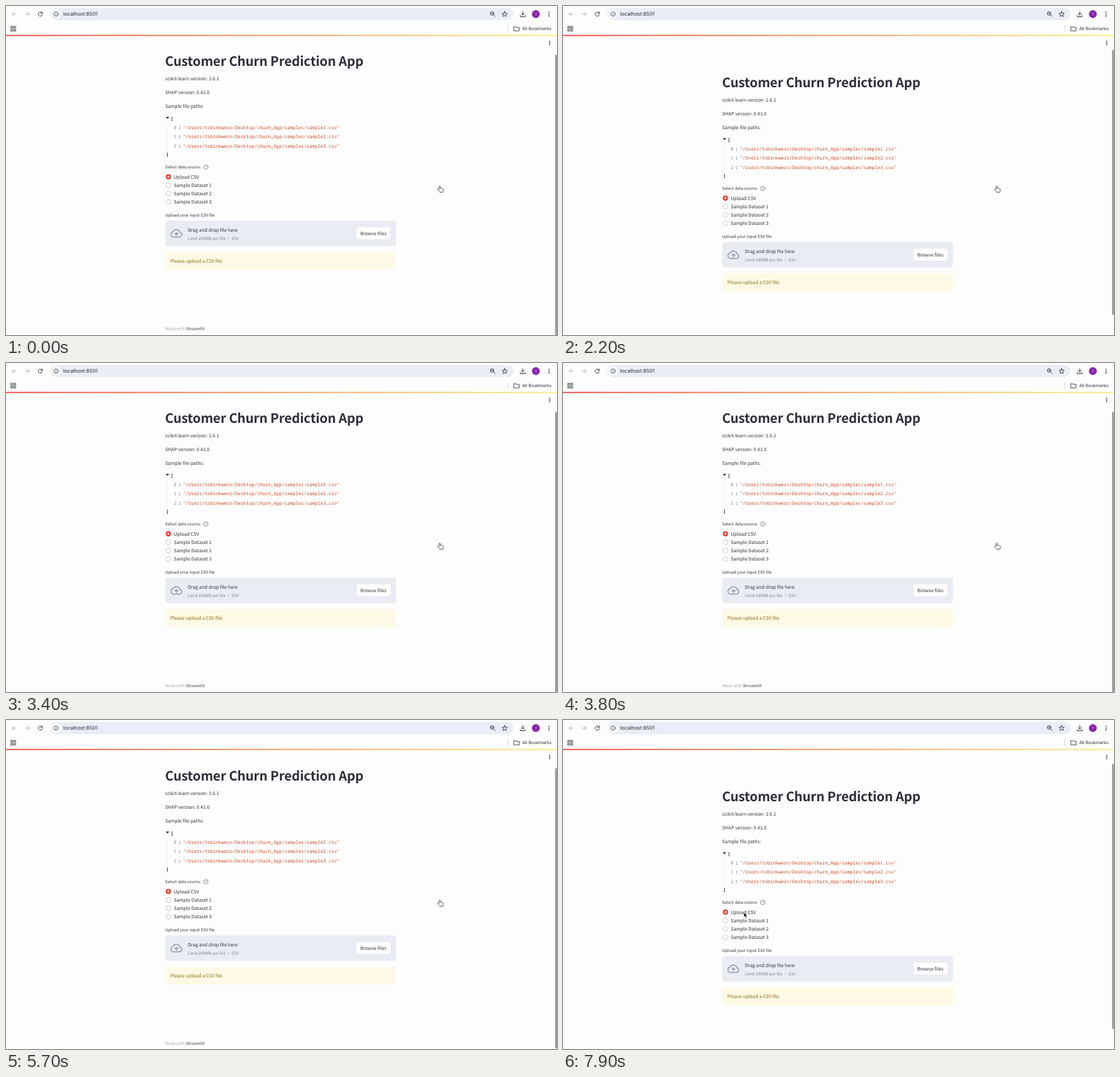
An HTML page that plays this animation: 800x478 px, repeating every 8000 ms.

```html
<!DOCTYPE html>
<html lang="en">
<head>
<meta charset="utf-8">
<title>Customer Churn Prediction App</title>
<style>
  html, body { margin: 0; width: 100%; height: 100%; overflow: hidden; background: #fdfdfd; }
  svg { display: block; width: 100%; height: 100%; }
  text { font: 6.82px "Noto Sans CJK SC", "Noto Sans CJK JP", "Noto Sans CJK KR", sans-serif;
         fill: #31333f; text-rendering: geometricPrecision; white-space: pre; }
  .title { font-size: 18.75px; font-weight: 700; letter-spacing: -.1px; fill: #2b2d39; }
  .small { font-size: 5.96px; }
  .mono { font: 6.66px "Noto Sans Mono", "DejaVu Sans Mono", monospace; }
  .bold { font-weight: 700; }
  .ui { font-family: Inter, Roboto, sans-serif; fill: #2a2c30; }
  .line { fill: none; stroke: #3c4043; stroke-width: 1; stroke-linecap: round; stroke-linejoin: round; }
  .off { stroke: #b4b7ba; }
</style>
</head>
<body>
<svg viewBox="0 0 800 478" preserveAspectRatio="none">
  <defs>
    <linearGradient id="accent">
      <stop offset="0" stop-color="#f5483f"/>
      <stop offset="1" stop-color="#fbf07f"/>
    </linearGradient>
  </defs>
  <rect width="800" height="478" fill="#fdfdfd"/>

  <g id="page">
    <text class="title" x="231" y="86.6">Customer Churn Prediction App</text>
    <text x="231" y="108.2">scikit-learn version: 1.6.1</text>
    <text x="231" y="128">SHAP version: 0.41.0</text>
    <text x="231" y="147.8">Sample file paths:</text>

    <path d="M232 161h5l-2.5 3z" fill="#31333f"/>
    <text class="mono bold" x="239" y="166.4">[</text>
    <path d="M234.5 170v39" stroke="#ebebee" stroke-width=".7"/>
    <g id="paths"></g>
    <text class="mono bold" x="232.4" y="218.2">]</text>

    <text class="small" x="231" y="236.3">Select data source:</text>
    <circle class="line" cx="290" cy="234" r="3.3" style="stroke-width:.7;stroke:#6d6f7a"/>
    <text class="small" x="290" y="236" text-anchor="middle" style="font-size:5px;fill:#5b5d68">?</text>
    <g id="radios"></g>

    <text class="small" x="231" y="306">Upload your input CSV file</text>
    <rect x="231" y="311.8" width="335.3" height="37.2" rx="3.8" fill="#e9edf3"/>
    <path class="line" d="M243 335.7a3.9 3.9 0 0 1-.5-7.7 5.4 5.4 0 0 1 10.1 1 3.4 3.4 0 0 1-.4 6.7zM247.5 333.6v-4.2m-2.2 2l2.2-2.2 2.2 2.2"
          style="stroke:#979bb0;stroke-width:1.4"/>
    <text x="264" y="328">Drag and drop file here</text>
    <text class="small" x="264" y="339.8" style="fill:#7d808b">Limit 200MB per file • CSV</text>
    <rect x="508.4" y="321.1" width="50.4" height="18.2" rx="3.8" fill="#fefefe" stroke="#d9dce2" stroke-width=".5"/>
    <text x="533.5" y="333" text-anchor="middle">Browse files</text>

    <rect x="231" y="357.5" width="335.3" height="26" rx="3.8" fill="#fef9e5"/>
    <text x="238.8" y="372.7" style="fill:#8c6c10">Please upload a CSV file.</text>
    <text class="small" x="231" y="471.2" style="fill:#a6a7ac">Made with <tspan class="bold" style="fill:#777982">Streamlit</tspan></text>
  </g>

  <g id="browser">
    <path class="line off" d="M14.8 11.8h-6m2.8-2.8l-2.8 2.8 2.8 2.8M27.8 11.8h6m-2.8-2.8l2.8 2.8-2.8 2.8"/>
    <path class="line" d="M52.3 10a3 3 0 1 0 .5 2.6M52.8 8.6v2.2h-2.2"/>
    <rect x="64" y="3" width="673" height="17.4" rx="8.7" fill="#e8edf6"/>
    <circle cx="72.8" cy="11.7" r="6.8" fill="#fbfcfd"/>
    <circle class="line" cx="72.6" cy="11.7" r="3.2" style="stroke-width:.8"/>
    <path class="line" d="M72.6 11.6v1.6M72.6 10v.1" style="stroke-width:.8"/>
    <text class="ui" x="83" y="14.3" style="font-size:7.35px">localhost:8501</text>

    <circle class="line" cx="705.8" cy="10.8" r="2.5"/>
    <path class="line" d="M707.8 12.8l2.4 2.4M704.8 10.8h2"/>
    <path id="star" class="line" style="stroke-width:.9"/>
    <path class="line" d="M750.3 8v5m-2.3-2.2l2.3 2.3 2.3-2.3M746.8 13.6v2h7v-2"/>
    <circle cx="769.3" cy="11.8" r="5.7" fill="#8a25ab"/>
    <text class="ui" x="769.3" y="13.6" text-anchor="middle" style="font-size:5px;fill:#e5c9ee">T</text>
    <g id="dots" fill="#3c4043"></g>

    <g class="line" style="stroke-width:.9">
      <rect x="7.3" y="29.6" width="2.5" height="2.5"/>
      <rect x="11.6" y="29.6" width="2.5" height="2.5"/>
      <rect x="7.3" y="33.9" width="2.5" height="2.5"/>
      <rect x="11.6" y="33.9" width="2.5" height="2.5"/>
    </g>
    <path d="M728.4 28v9.5" stroke="#cfd6e2" stroke-width=".9"/>
    <path class="line" d="M737.6 30h2.6l1 1.1h3.9v5h-7.5z" style="stroke-width:.9"/>
    <text class="ui" x="749.5" y="35" style="font-size:6.3px">All Bookmarks</text>
    <rect y="41.9" width="800" height="1.7" fill="url(#accent)"/>
  </g>

  <rect id="thumb" x="797.2" width="2.8" rx="1.2" fill="#9d9da1"/>
  <path id="hand" d="M2.2 5V1.1c0-1.3 1.7-1.3 1.7 0v2.3c.6-.5 1.4-.3 1.6.3.6-.4 1.3-.1 1.5.5.7-.3 1.4.1 1.4.9v1.6c0 1-.7 1.5-.8 2.5H3.3C2.8 7.900 1.300 7 .3 5.700-.2 4.800.7 4.200 1.300 4.700z"
        fill="#fff" stroke="#33353b" stroke-width=".8" stroke-linejoin="round"/>
  <path id="arrow" d="M0 0v7.400l1.700-1.600 1.200 2.800 1.400-.6-1.200-2.700h2.300z"
        fill="#111" stroke="#fff" stroke-width=".6" stroke-linejoin="round"/>
</svg>
<script>
const $ = id => document.getElementById(id);
const LOOP = 8000, STEP = 100, SCROLL_MAX = 31;

$("paths").innerHTML = [0, 1, 2].map(i => {
  const y = 179 + i * 13.4;
  return `<text class="mono" x="243.400" y="${y}" style="fill:#958fa6">${i}</text>
    <text class="mono bold" x="250" y="${y}">:</text>
    <text class="mono" x="256.800" y="${y}" style="fill:#cd4a24">"/Users/tobinkwero/Desktop/churn_App/samples/sample${i + 1}.csv"</text>`;
}).join("");

$("radios").innerHTML = ["Upload CSV", "Sample Dataset 1", "Sample Dataset 2", "Sample Dataset 3"].map((label, i) => {
  const y = 248.1 + i * 12.2;
  const mark = i
    ? `<circle cx="235.800" cy="${y}" r="3.600" fill="#fefefe" stroke="#b4b6be" stroke-width=".7"/>`
    : `<circle cx="235.800" cy="${y}" r="3.900" fill="#f0453c"/><circle cx="235.800" cy="${y}" r="1.400" fill="#fff"/>`;
  return `${mark}<text x="243.400" y="${y + 2.7}">${label}</text>`;
}).join("");

$("dots").innerHTML = [[788.4, 11.8, 2.7], [789.4, 53.8, 2.3]].map(([x, y, gap]) =>
  [-1, 0, 1].map(k => `<circle cx="${x}" cy="${y + k * gap}" r=".9"/>`).join("")).join("");

$("star").setAttribute("d", "M" + Array.from({ length: 10 }, (_, i) => {
  const a = i * Math.PI / 5, r = i % 2 ? 1.8 : 4;
  return `${724 + r * Math.sin(a)} ${12 - r * Math.cos(a)}`;
}).join("L") + "z");

// start, duration, page offset reached
const scrolls = [
  [1290, 310, SCROLL_MAX], [2500, 200, 0], [3990, 310, SCROLL_MAX],
  [4900, 300, 0], [5667, 310, SCROLL_MAX]
];

function ease(t, start, length) {
  const u = Math.min(1, Math.max(0, (t - start) / length));
  return u * u * (3 - 2 * u);
}

function pageOffset(t) {
  return Math.round(scrolls.reduce((y, [start, length, to]) =>
    y + (to - y) * ease(t, start, length), 0));
}

function place(id, x, y) {
  $(id).setAttribute("transform", `translate(${x} ${y})`);
}

function draw(time) {
  const t = Math.floor((time % LOOP) / STEP) * STEP;
  const y = pageOffset(t);
  place("page", 0, y);

  const shift = y * 29 / SCROLL_MAX;
  const top = Math.max(64, 71 - shift);
  $("thumb").setAttribute("y", top);
  $("thumb").setAttribute("height", 478 - shift - top);

  const moving = t >= 6400;
  const m = ease(t, 6300, 1400);
  $("hand").style.display = moving ? "none" : "";
  $("arrow").style.display = moving ? "" : "none";
  place("hand", 626.6, 261.4);
  place("arrow", 629.5 + (262.6 - 629.5) * m, 262 + (279.3 - 262) * m);
}

const begin = performance.now();
function tick() {
  draw(performance.now() - begin);
  requestAnimationFrame(tick);
}
tick();
</script>
</body>
</html>
```
